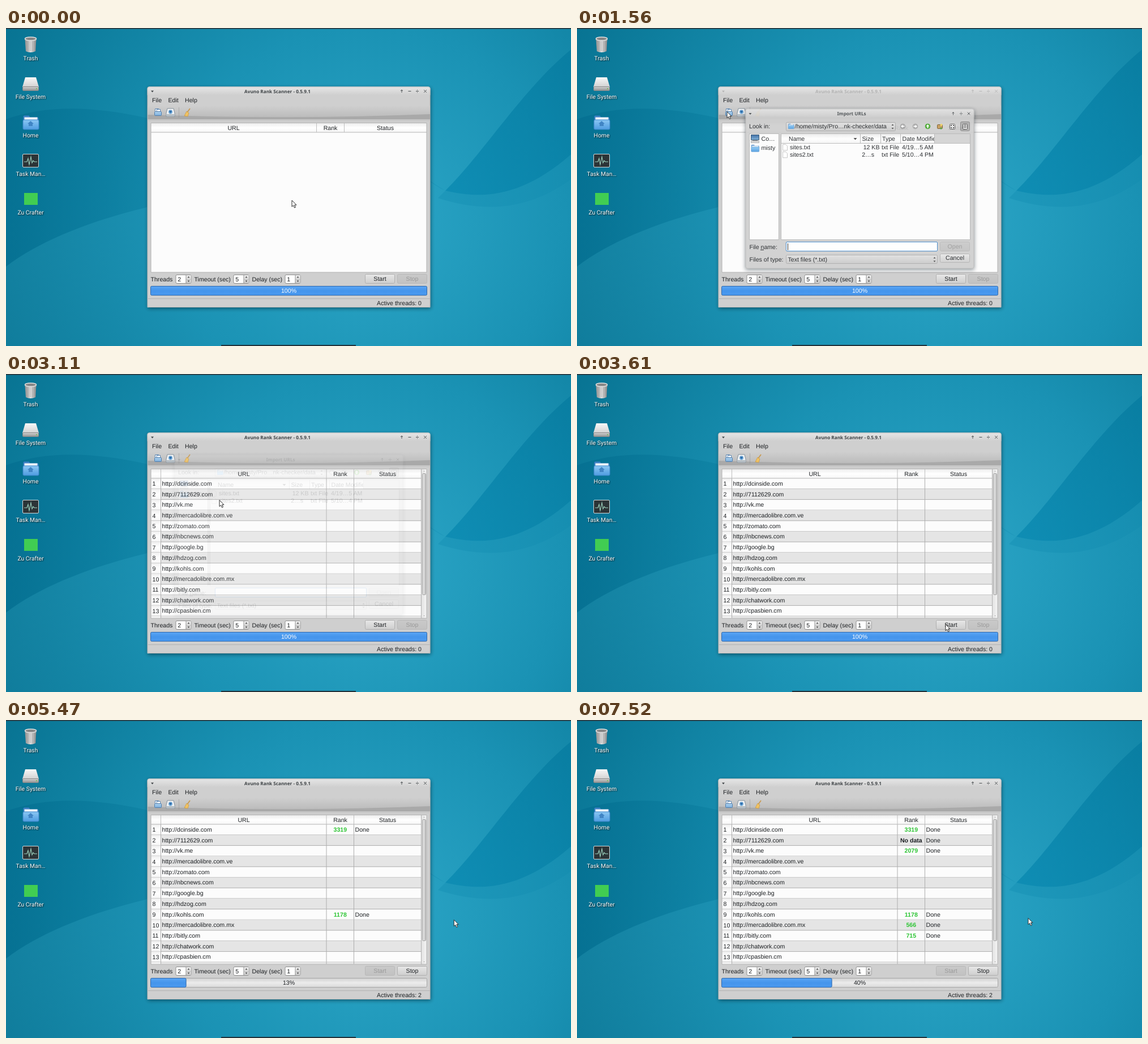
An HTML page with a canvas for the animation above (8000 ms loop, 998x561 px).

```html
<!DOCTYPE html>
<html lang="en">
<head>
<meta charset="utf-8">
<title>Rank scanner</title>
<style>
html, body { margin: 0; width: 100%; height: 100%; overflow: hidden; background: #1386a8; }
canvas { display: block; }
</style>
</head>
<body>
<canvas id="stage" width="998" height="561"></canvas>
<script>
const W = 998, H = 561, LOOP = 8000;
const UI = '10.6px "Liberation Sans", Arial, sans-serif';
const BOLD = 'bold ' + UI;
const LABEL = '10.4px Roboto, sans-serif';
const TITLE = 'bold 8.2px "Noto Sans", sans-serif';
const INK = '#1c1f22', FACE = '#cfcfcf', EDGE = '#b2b2b2', GREEN = '#2dc534';

const stage = document.getElementById('stage').getContext('2d');
let g = stage;

function layer(draw) {
  const c = document.createElement('canvas');
  c.width = W;
  c.height = H;
  const previous = g;
  g = c.getContext('2d');
  draw();
  g = previous;
  return c;
}

function text(s, x, y, { align = 'left', color = INK, font = UI } = {}) {
  g.font = font;
  g.textAlign = align;
  g.textRendering = 'geometricPrecision';
  g.fillStyle = color;
  g.fillText(s, x, y + 3.7);
}

function rect(x, y, w, h, fill) {
  g.fillStyle = fill;
  g.fillRect(x, y, w, h);
}

function box(x, y, w, h, fill, stroke, r = 0) {
  g.beginPath();
  g.roundRect(x + .5, y + .5, w - 1, h - 1, r);
  if (fill) { g.fillStyle = fill; g.fill(); }
  if (stroke) { g.strokeStyle = stroke; g.lineWidth = 1; g.stroke(); }
}

function ramp(x0, y0, x1, y1, ...colors) {
  const r = g.createLinearGradient(x0, y0, x1, y1);
  colors.forEach((c, i) => r.addColorStop(i / (colors.length - 1), c));
  return r;
}
const vertical = (y, h, ...colors) => ramp(0, y, 0, y + h, ...colors);

function shape(d, fill, stroke, width = 1) {
  const p = new Path2D(d);
  if (fill) { g.fillStyle = fill; g.fill(p); }
  if (stroke) { g.strokeStyle = stroke; g.lineWidth = width; g.stroke(p); }
}

function disc(x, y, r, fill) {
  g.beginPath();
  g.arc(x, y, r, 0, Math.PI * 2);
  g.fillStyle = fill;
  g.fill();
}

function wallpaper() {
  const glow = g.createRadialGradient(640, 340, 40, 640, 340, 720);
  glow.addColorStop(0, '#2aa4c5');
  glow.addColorStop(.45, '#1a92b4');
  glow.addColorStop(1, '#087493');
  rect(0, 0, W, H, glow);
  shape('M0 161C70 136 150 137 250 159C380 190 480 250 560 290C420 270 130 320 0 421Z',
    ramp(0, 0, 520, 0, 'rgba(0,105,140,.5)', 'rgba(0,120,155,0)'));
  shape('M0 421C130 320 420 270 560 290L760 561H0Z',
    ramp(0, 300, 420, 561, 'rgba(60,165,195,.16)', 'rgba(60,165,195,0)'));
  // leaf above the dipping curve, pale band below it
  shape('M998 38C915 105 840 225 776 287C840 302 910 300 998 223Z',
    ramp(776, 287, 998, 100, 'rgba(0,130,172,.6)', 'rgba(0,118,156,.55)'));
  shape('M740 264Q758 279 776 287L763 300C840 325 920 324 998 267V223C910 300 840 302 776 287Z',
    ramp(750, 0, 998, 0, 'rgba(0,125,165,.22)', 'rgba(0,125,165,.12)'));
  rect(0, 0, W, 1.6, '#2b3338');
  rect(380, 559, 238, 2, '#22323b');
}

function folder(x, y, s) {
  g.save();
  g.translate(x, y);
  g.scale(s, s);
  shape('M1 2Q1 0 3 0H11L13 3H26Q28 3 28 5V12H1Z', '#3c7fc4');
  rect(3, 3, 23, 8, '#eef4fa');
  box(0, 7, 29, 18, vertical(7, 18, '#8cc8f4', '#4d9be0'), '#3f86c9', 2);
  g.restore();
}

function desktopIcons() {
  shape('M33.500 20L35 41Q43.500 45 52 41L53.500 20Z', ramp(33, 0, 54, 0, '#8c8c8c', '#e2e2e2', '#8c8c8c'));
  for (let x = 37; x < 53; x += 3) rect(x, 23, 1, 18, 'rgba(90,90,90,.3)');
  g.beginPath();
  g.ellipse(43.5, 19, 10, 3, 0, 0, 7);
  g.fillStyle = '#858585';
  g.fill();
  g.strokeStyle = '#dedede';
  g.lineWidth = 1.5;
  g.stroke();

  shape('M34 87H53L58 104H29Z', vertical(87, 17, '#f8f8f8', '#d2d2d2'));
  box(29, 103, 29, 8, vertical(103, 8, '#d6d6d6', '#8e8e8e'), '#8a8a8a', 1.5);
  disc(54, 107, 1, '#6dc04b');

  folder(29.500, 154.500, 1);
  shape('M43.500 164L49 169H47V173H40V169H38Z', '#4185c5');

  box(29, 222, 29, 24, '#2c3437', '#d6d8d7', 1.5);
  shape('M32 236H37L39 230L41 241L44 227L46 238L48 234L50 236H55', null, '#9fd6c2', 1.1);

  rect(32, 291, 24, 21, '#41cd52');

  g.shadowColor = 'rgba(0,0,0,.9)';
  g.shadowBlur = 2;
  g.shadowOffsetX = g.shadowOffsetY = 1;
  ['Trash', 'File System', 'Home', 'Task Man…', 'Zu Crafter'].forEach((s, i) =>
    text(s, 43.5, 53 + 68 * i, { align: 'center', color: '#fff', font: LABEL }));
  g.shadowColor = 'transparent';
}

function frame(x, y, w, h) {
  g.save();
  g.shadowColor = 'rgba(0,20,30,.5)';
  g.shadowBlur = 7;
  g.shadowOffsetY = 2;
  g.beginPath();
  g.roundRect(x, y, w, h, [4, 4, 1, 1]);
  g.fillStyle = FACE;
  g.fill();
  g.restore();
  g.beginPath();
  g.roundRect(x, y, w, 15, [4, 4, 0, 0]);
  g.fillStyle = vertical(y, 15, '#e6e6e6', '#cfcfcf');
  g.fill();
  box(x, y, w, h, null, 'rgba(150,150,150,.4)', 3);
}

function titleBar(s, cx, y, menuX, icons, color) {
  text(s, cx, y - .7, { align: 'center', color, font: TITLE });
  shape(`M${menuX - 2.5} ${y - 1}h5l-2.500 3z`, color);
  for (const [kind, x] of icons) {
    const marks = {
      up: `M${x} ${y + 2.5}v-5m-2 2l2 -2l2 2`,
      min: `M${x - 2.5} ${y}h5`,
      max: `M${x - 2.5} ${y}h5M${x - .5} ${y - 2.2}h1M${x - .5} ${y + 2.2}h1`,
      close: `M${x - 2.3} ${y - 2.3}l4.600 4.600m0 -4.600l-4.600 4.600`
    };
    shape(marks[kind], null, color, .9);
  }
}

function button(s, x, y, enabled, h = 17) {
  box(x, y, 53, h, vertical(y, h, ...(enabled ? ['#e8e8e8', '#cdcdcd'] : ['#c9c9c9', '#c2c2c2'])),
    enabled ? '#b0b0b0' : '#b8b8b8', 2);
  text(s, x + 26.5, y + h / 2 - .5, { align: 'center', color: enabled ? INK : '#999' });
}

function arrows(x, y, gap) {
  shape(`M${x - 2} ${y - gap + 1}h4l-2 -2.500zM${x - 2} ${y + gap - 1}h4l-2 2.500z`, '#444');
}

function spin(label, lx, value, x) {
  text(label, lx, 443);
  box(x, 435, 28, 16, '#fff', '#8e8e8e', 2);
  rect(x + 18, 436, 9, 14, vertical(436, 14, '#eee', '#ccc'));
  rect(x + 18, 436, 1, 14, '#999');
  rect(x + 18, 443, 9, 1, '#bbb');
  arrows(x + 23, 443, 3.5);
  text(value, x + 3.7, 443);
}

function toolbar() {
  rect(250.500, 137, 498.500, 24, vertical(137, 24, '#cfcfcf', '#b8b8b8'));
  shape('M250.500 153Q500 162 749 152V161H250.500Z', '#a9a9a9');
  rect(250.500, 161, 498.500, 5, vertical(161, 5, '#c4c4c4', FACE));

  box(263, 142, 7, 11, '#f0f5fa', '#5f88b3');
  box(266, 143, 7, 11, '#fff', '#5f88b3');
  box(262, 147, 13, 8, vertical(147, 8, '#b4d6f2', '#78abda'), '#4f7dac', 1);
  shape('M285 142H296L298 150V156H283V150Z', '#eef0f2', '#84919b');
  rect(284, 152, 13, 3, '#b3bcc2');
  disc(290.5, 148, 3.4, '#6aa5d6');
  shape('M288 146h5l-2.500 4.500z', '#2c6ba8');
  rect(305, 140, 1, 18, 'rgba(120,120,120,.35)');
  shape('M325 142L320 149', null, '#c99a52', 1.8);
  shape('M319 147L323 150L321 156L315 155Z', '#f0c263', '#c8963f', .7);
}

const SITES = ['dcinside.com', '7112629.com', 'vk.me', 'mercadolibre.com.ve', 'zomato.com',
  'nbcnews.com', 'google.bg', 'hdzog.com', 'kohls.com', 'mercadolibre.com.mx', 'bitly.com',
  'chatwork.com', 'cpasbien.cm'];
const ROW = 18.7, TOP = 184;

// row, rank, check start, check end
const JOBS = [
  [1, '3319', 4510, 4870], [9, '1178', 4580, 4940],
  [2, 'No data', 5850, 6160], [10, '566', 5920, 6230],
  [3, '2079', 7150, 7450], [11, '715', 7210, 7520]
];
const START = 4510, LOADED = 2900;

function header(columns) {
  rect(256, 168, 487, 16, vertical(168, 16, '#ededed', '#fff', '#f6f6f6'));
  rect(256, 183.5, 487, 1, '#b5b5b5');
  for (const [label, cx, right] of columns) {
    text(label, cx, 176, { align: 'center' });
    if (right) rect(right, 168, 1, 16, '#bfbfbf');
  }
}

function emptyTable() {
  rect(256, 168, 487, 263, '#fcfcfc');
  header([['URL', 402, 548], ['Rank', 573, 597], ['Status', 670]]);
  box(255.5, 167, 488, 264.500, null, EDGE);
}

function filledTable() {
  rect(256, 168, 487, 263, '#fcfcfc');
  g.save();
  g.beginPath();
  g.rect(256, 168, 478, 262.500);
  g.clip();
  for (let i = 0; i < 14; i++) {
    const y = TOP + i * ROW;
    if (i % 2) rect(273, y, 460, ROW, '#e5e5e5');
    rect(256, y, 17, ROW, vertical(y, ROW, '#f0f0f0', '#fff', '#f6f6f6'));
    rect(256, y + ROW - .5, 478, 1, '#adadad');
    if (i < SITES.length) {
      text(String(i + 1), 258.5, y + 9.7);
      text('http://' + SITES[i], 275.5, y + 9.2);
    }
  }
  for (const x of [273, 565.5, 614]) rect(x, TOP, 1, 247, '#adadad');
  g.restore();
  header([['URL', 420, 565.5], ['Rank', 590.5, 614], ['Status', 674, 733], ['', 0, 273]]);
  rect(733, 168, 1, 263, EDGE);
  rect(734, 168, 9, 263, ramp(734, 0, 743, 0, '#e2e2e2', '#f5f5f5'));
  box(735, 175, 7, 215, ramp(735, 0, 742, 0, '#e5e5e5', '#c4c4c4'), '#a0a0a0', 2);
  rect(738, 171, 1, 1, '#777');
  rect(738, 426, 1, 1, '#777');
  box(255.5, 167, 488, 264.500, null, EDGE);
}

function mainWindow() {
  frame(249.5, 103.5, 500, 389.5);
  ['File', 'Edit', 'Help'].forEach((s, i) => text(s, [258, 286.5, 316][i], 127));
  toolbar();
  spin('Threads', 255.5, '2', 299.5);
  spin('Timeout (sec)', 332.5, '5', 401.5);
  spin('Delay (sec)', 434.5, '1', 492.5);
  rect(251, 477, 498, 1, '#b3b3b3');
}

function navDisc(x, color, arrow) {
  disc(x, 173.5, 4.8, color);
  shape(arrow, '#fff');
}

function dialog() {
  frame(297.5, 142.5, 404, 282);
  titleBar('Import URLs', 485, 151, 306, [['up', 664.5], ['max', 678.5], ['close', 692]], '#4a4f52');
  text('Look in:', 304, 173.5);
  box(369, 166, 194, 16, vertical(166, 16, '#e2e2e2', '#c8c8c8'), '#aaa', 2);
  folder(373, 169, .36);
  text('/home/misty/Pro…nk-checker/data', 384.5, 173.5);
  arrows(557.5, 174, 3);
  navDisc(575.5, '#a5a5a5', 'M572 173.500l3.500 -3v2h3v2h-3v2z');
  navDisc(597.5, '#a5a5a5', 'M601 173.500l-3.500 -3v2h-3v2h3v2z');
  navDisc(619.5, '#45a62c', 'M619.500 170l3 3.500h-2v3h-2v-3h-2z');
  box(636, 170, 10, 8, '#c59a57', '#74562b', 1);
  disc(643.5, 171, 2, '#f0d264');
  disc(643, 177, 1.8, '#4f9b3a');
  box(658, 169, 10, 10, '#f4f4f4', '#555', 1);
  for (const x of [660, 664]) for (const y of [171, 175]) rect(x, y, 2, 2, '#444');
  box(677, 165, 17, 17, '#aeaeae', '#858585', 2);
  box(681, 169, 9, 10, '#f4f4f4', '#444', 1);
  for (const y of [171, 173, 175]) rect(683, y, 5, 1, '#555');

  box(304, 186, 53, 188, '#fcfcfc', EDGE);
  box(307, 188, 15, 10, vertical(188, 10, '#2e619c', '#79add7'), '#31506d');
  rect(310, 198, 9, 2, '#999');
  box(307, 199, 15, 4, '#ddd', '#aaa');
  text('Co…', 325.5, 195.5);
  folder(307.5, 206, .5);
  text('misty', 325.5, 211.500);

  box(360, 186, 335, 188, '#fcfcfc', EDGE);
  rect(361, 187, 271, 17, vertical(187, 17, '#ececec', '#fff', '#f3f3f3'));
  rect(632, 187, 62, 17, '#d2d2d2');
  rect(361, 203, 333, 1, '#b8b8b8');
  for (const x of [500, 536, 571, 631]) rect(x, 187, 1, 17, '#b5b5b5');
  text('Name', 374, 195.5);
  shape('M488.500 194h6l-3 3.500z', '#444');
  text('Size', 503.5, 195.5);
  text('Type', 539, 195.5);
  g.save();
  g.beginPath();
  g.rect(572, 187, 59, 17);
  g.clip();
  text('Date Modified', 574.5, 195.5);
  g.restore();
  [['sites.txt', '12 KB', '4/19…5 AM'], ['sites2.txt', '2…s', '5/10…4 PM']].forEach(([name, size, date], i) => {
    const y = 210.3 + 13 * i;
    shape(`M363.500 ${y - 5}h5l3 3v7.500h-8z`, '#fff', '#b5b5b5', .8);
    text(name, 376, y);
    text(size, i ? 525 : 534.5, y, { align: 'right' });
    text('txt File', 538, y);
    text(date, 574, y);
  });

  text('File name:', 304.5, 386);
  rect(324, 391, 6, 1, INK);
  box(369, 377, 268, 17, '#fff', '#3d85c8', 1.5);
  button('Open', 641, 377, false);
  text('Files of type:', 304.5, 408);
  box(369, 400, 268, 16, vertical(400, 16, '#e0e0e0', '#c8c8c8'), '#aaa', 2);
  text('Text files (*.txt)', 372.5, 408);
  arrows(631.5, 408.500, 3);
  button('Cancel', 641, 398, true, 16);
}

function progress(percent) {
  box(255, 455, 489, 17, vertical(455, 17, '#cfcfcf', '#ececec', '#d8d8d8'), '#a6a6a6', 2);
  box(255, 455, 4.89 * percent, 17, vertical(455, 17, '#5aa6f5', '#4595ec', '#4b9af0'), '#3069ad', 2);
  text(percent + '%', 499.5, 463.3, { align: 'center', color: percent > 50 ? '#fff' : INK });
}

function results(t) {
  let done = 0;
  for (const [row, rank, begin, end] of JOBS) {
    if (t < begin) continue;
    const y = TOP + (row - 1) * ROW + 9.3;
    text(t < end ? 'Checking ...' : 'Done', 616.5, y);
    if (t < end) continue;
    done++;
    text(rank, 590.3, y, { align: 'center', font: BOLD, color: rank === 'No data' ? INK : GREEN });
  }
  return done;
}

// start, end, from x/y, control x/y, to x/y
const MOVES = [
  [50, 810, 505, 304, 290, 80, 265, 147.5],
  [1820, 2500, 265, 147.5, 320, 180, 377, 222.5],
  [3350, 3610, 377, 222.5, 540, 330, 651, 441.5],
  [3800, 4010, 651, 441.5, 656, 442, 661.5, 442],
  [4870, 5550, 661.5, 442, 720, 390, 797, 349.5]
];

function pointer(t) {
  let [x, y] = MOVES[0].slice(2);
  for (const [t0, t1, x0, y0, cx, cy, x1, y1] of MOVES) {
    if (t < t0) break;
    const p = Math.min(1, (t - t0) / (t1 - t0));
    const u = p * p * (3 - 2 * p), v = 1 - u;
    x = v * v * x0 + 2 * u * v * cx + u * u * x1;
    y = v * v * y0 + 2 * u * v * cy + u * u * y1;
  }
  shape(`M${x} ${y}v11.300l2.600 -2.400l1.900 4.200l2 -.900l-1.900 -4h3.400z`, '#fff', '#2b2b2b', 1);
}

const clamp = v => Math.max(0, Math.min(1, v));
const scene = layer(() => { wallpaper(); desktopIcons(); mainWindow(); });
const empty = layer(emptyTable);
const filled = layer(filledTable);
const picker = layer(dialog);

function draw(t) {
  g.drawImage(scene, 0, 0);
  const inactive = t >= 1280 && t < LOADED;
  titleBar('Avuno Rank Scanner - 0.5.9.1', 479.5, 111.5, 258.5,
    [['up', 699], ['min', 713], ['max', 726.5], ['close', 740.5]], inactive ? '#b3b3b3' : '#3d4245');
  g.drawImage(t < LOADED ? empty : filled, 0, 0);
  const done = results(t);
  const running = t >= START;
  button('Start', 634, 434, !running);
  button('Stop', 691, 434, running);
  progress(done ? Math.floor(done / 15 * 100) : 100);
  text('Active threads: ' + (running ? 2 : 0), 734, 485.3, { align: 'right' });

  const alpha = t >= 1280 ? Math.min(clamp((t - 1240) / 350), 1 - clamp((t - 2850) / 300)) : 0;
  if (alpha > 0) {
    g.globalAlpha = alpha;
    g.drawImage(picker, 0, 0);
    if (t < 2000 || (t >= 2480 && t < 2740)) rect(372, 380, 1, 12, '#222');
    g.globalAlpha = 1;
  }
  pointer(t);
}

const origin = performance.now();
function tick() {
  draw((performance.now() - origin) % LOOP);
  requestAnimationFrame(tick);
}
tick();
</script>
</body>
</html>
```
